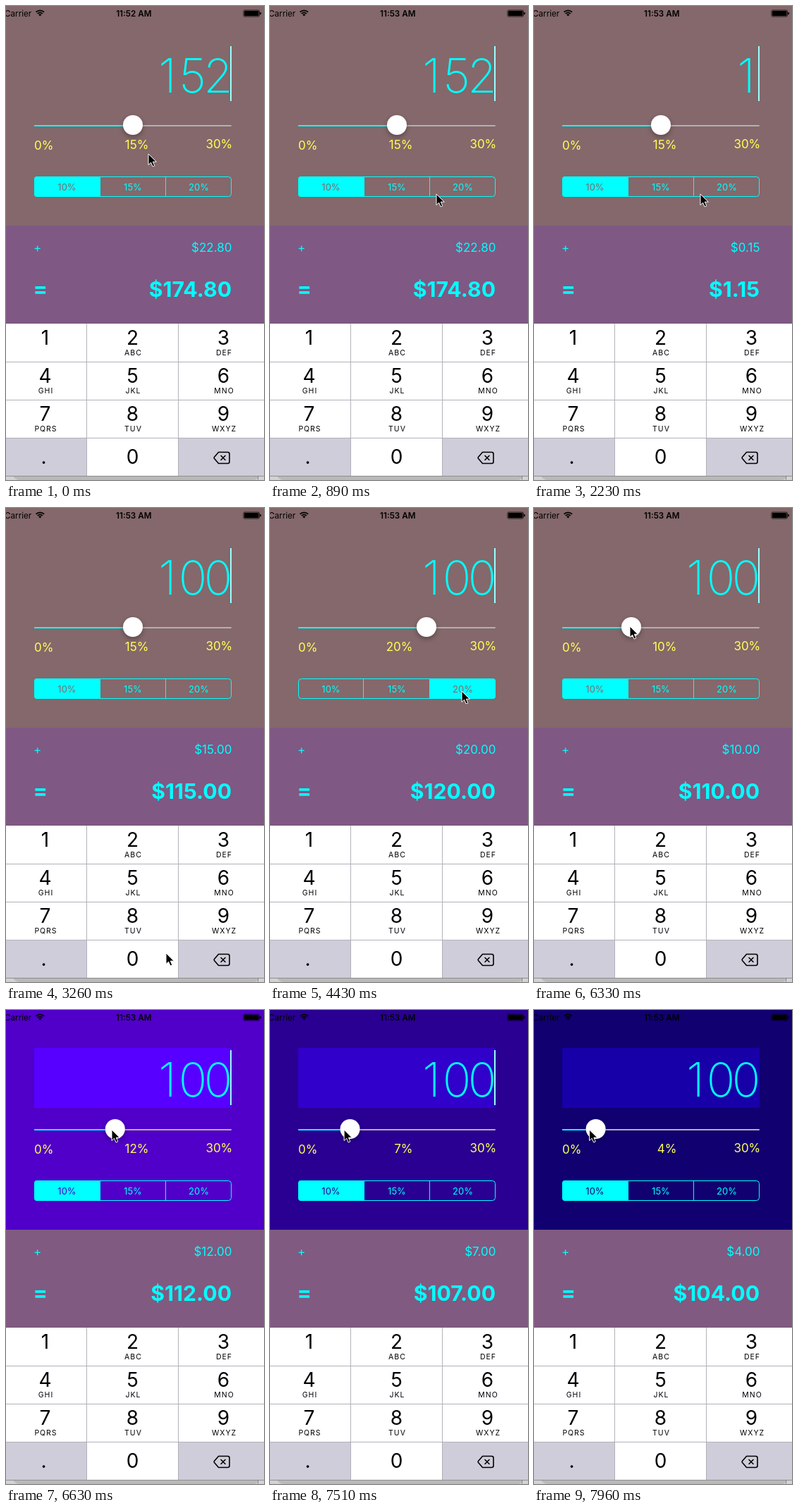
Write an HTML page that moves like this. It is 366 by 673 pixels and loops after 8 s.

```html
<!DOCTYPE html>
<html lang="en">
<head>
<meta charset="utf-8">
<title>Tip calculator</title>
<style>
html, body { margin: 0; width: 100%; height: 100%; overflow: hidden; }
svg { display: block; width: 366px; height: 673px; font-family: Inter, Roboto, sans-serif; }
.mid { text-anchor: middle; }
.end { text-anchor: end; }
.cyan { fill: #0ff; }
.yellow { fill: #ffff55; font-size: 17px; }
.small { font-size: 17px; }
.bold { font-size: 30.2px; font-weight: 700; }
.big { font-size: 67px; font-weight: 200; }
.key { font-size: 28px; }
.sub { font-size: 10.5px; letter-spacing: 1px; }
.seg { font-size: 13px; }
</style>
</head>
<body>
<svg viewBox="0 0 366 673">
  <clipPath id="round"><rect x="40" y="242" width="280" height="29" rx="4"/></clipPath>
  <rect id="top" width="366" height="312"/>
  <rect id="panel" y="312" width="366" height="139"/>
  <rect id="field" x="40" y="54" width="280" height="85"/>

  <g font-size="11.7">
    <text x="-2" y="14.5">Carrier</text>
    <path d="M42.5 8.7a8.2 8.2 0 0 1 11.6 0M44.7 11a5 5 0 0 1 7.2 0" fill="none" stroke="#000" stroke-width="1.7"/>
    <path d="M46.2 12.3a3 3 0 0 1 4.2 0l-2.1 2.2z"/>
    <text id="clock" class="mid" x="181.3" y="14.5" font-weight="600"></text>
    <rect x="337" y="6" width="22.500" height="9" rx="1.800" fill="none" stroke="#000" stroke-width=".8"/>
    <rect x="338" y="7" width="20.500" height="7" rx="1"/>
    <rect x="360.3" y="8.7" width="1.6" height="3.6" rx=".8"/>
  </g>

  <text id="bill" class="big mid cyan" y="123"></text>
  <rect id="caret" x="318" y="57" width="2" height="78" fill="#9ff"/>

  <rect x="40" y="169" width="280" height="2" rx="1" fill="#b3b0b3"/>
  <rect id="track" class="cyan" x="40" y="169" height="2" rx="1"/>
  <circle id="knob" cy="169" r="14" fill="#fff" style="filter:drop-shadow(0 3px 3px rgba(0,0,0,.3))"/>
  <text class="yellow" x="40" y="204">0%</text>
  <text id="rate" class="yellow end" x="202.5" y="203"></text>
  <text class="yellow end" x="321.3" y="202">30%</text>

  <g id="segs" clip-path="url(#round)"></g>
  <rect x="40.5" y="242.5" width="279" height="28" rx="4" fill="none" stroke="#0ff"/>
  <path d="M132.5 242v29M226.5 242v29" stroke="#0ff"/>

  <text class="small cyan" x="39" y="349">+</text>
  <text id="tip" class="small end cyan" x="320.500" y="349"></text>
  <text class="bold cyan" x="38.5" y="411.500">=</text>
  <text id="total" class="bold end cyan" x="320" y="413"></text>

  <g id="keys"></g>
  <path d="M0 505.5h366m-366 54h366m-366 54h366M114.5 451v216m130 0v-216" fill="none" stroke="#b2b1b8"/>
  <g fill="none" stroke="#000" stroke-width="1.6" stroke-linejoin="round" stroke-linecap="round">
    <path d="M301.5 633.5h13q2.5 0 2.5 2.5v11q0 2.5-2.5 2.5h-13l-6-7q-.8-1 0-2z"/>
    <path d="M305 638.5l6 6m0-6l-6 6"/>
  </g>
  <rect y="667" width="366" height="6" fill="#d2d2d2"/>
  <path d="M10 667h350q-3 6-10 6h-330q-7 0-10-6z" fill="#b9b9b9"/>
  <path d="M0 667.5h366M357.5 668v5" stroke="#8e8e8e"/>

  <path id="mouse" d="M0 0v15.5l3.6-3.3 2.5 5.8 2.7-1.2-2.5-5.6h5z" stroke="#fff" stroke-linejoin="round"/>
</svg>
<script>
const LOOP = 8000, STEP = 147.2, DRAG = 44;
const $ = id => document.getElementById(id);
const set = (id, attrs) => { for (const k in attrs) $(id).setAttribute(k, attrs[k]); };
const clamp = v => Math.max(0, Math.min(1, v));
const money = v => '$' + v.toFixed(2);

// Where the mouse rests: arrival step, leaving step, x, y
const rests = [
  [0, 1, 202, 210], [4, 4, 186, 384], [6, 15, 236, 267], [19, 23, 227, 632],
  [27, 30, 272, 260], [35, 35, 167, 256], [38, 39, 90, 257], [43, 43, 136, 168]
];
// Hard changes: step and new value
const bills = [[0, '152'], [12, '15'], [15, '1'], [19, '10'], [21, '100']];
const picks = [[0, 0], [29, 2], [36, 1], [39, 0]];
const latest = (list, n) => list.findLast(e => e[0] <= n)[1];

const percents = [10, 15, 20];
const segX = i => Math.round(40 + i * 280 / 3);
$('segs').innerHTML = percents.map((p, i) =>
  `<rect id="seg${i}" x="${segX(i)}" y="242" width="94" height="29"/>
   <text id="lab${i}" class="seg mid" x="${86.5 + 93.5 * i}" y="261.5">${p}%</text>`).join('');

const labels = ['1', '2 ABC', '3 DEF', '4 GHI', '5 JKL', '6 MNO', '7 PQRS', '8 TUV', '9 WXYZ', '.', '0', ''];
const midX = [55.5, 179.5, 308.5];
$('keys').innerHTML = labels.map((label, i) => {
  const [digit, sub = ''] = label.split(' ');
  const col = i % 3, row = Math.floor(i / 3), y = 451 + 54 * row;
  const fill = /\d/.test(digit) ? '#fff' : '#cfcdd9';
  return `<rect id="key${i}" x="${[0, 114, 244][col]}" y="${y}" width="131" height="54" fill="${fill}"/>
    <text class="key mid" x="${midX[col] - (digit === '.' ? 2 : 0)}" y="${y + (row < 3 ? 30 : 37)}">${digit}</text>
    <text class="sub mid" x="${midX[col] + 1}" y="${y + 45}">${sub}</text>`;
}).join('');

function rateAt(n) {
  if (n < 29) return 15;
  if (n < DRAG) return percents[latest(picks, n)];
  return n <= 45 ? n - 33 : 12 - 8 * ((n - 45) / 9) ** 1.2;
}
const knobX = rate => 54 + rate * 8.4;

function mouseAt(n) {
  // While dragging, the knob trails the mouse by one step
  if (n >= DRAG) return [knobX(rateAt(n + 1)), 170];
  const i = rests.findLastIndex(r => r[0] <= n);
  const [, leave, x, y] = rests[i], [arrive, , x2, y2] = rests[i + 1] || [n + 1, 0, x, y];
  const k = clamp((n - leave) / (arrive - leave)), ease = k * k * (3 - 2 * k);
  return [x + (x2 - x) * ease, y + (y2 - y) * ease];
}

// The caret stays lit while typing, then blinks once a second
function caretAt(t) {
  if (t > 1760 && t < 3500) return 1;
  const p = (t + (t < 1760 ? 400 : 0)) % 1000;
  return clamp(Math.min((p - 100) / 150, (800 - p) / 150));
}

function draw(t) {
  const n = Math.floor((t + 1) / STEP);
  const bill = latest(bills, n), pick = latest(picks, n), tap = latest(picks, n + 1);
  const rate = rateAt(n), whole = Math.round(rate), tip = bill * whole / 100;
  const dragged = n >= DRAG, red = 8 * rate - 16, blue = 68 + 11 * rate;
  const back = dragged ? `rgb(${red},0,${blue})` : '#84686b';

  set('top', { fill: back });
  set('panel', { fill: dragged ? '#805a81' : '#7f5883' });
  set('field', { fill: dragged ? `rgb(${red + 8},0,${blue + 56})` : 'none' });
  set('caret', { opacity: caretAt(n * STEP) });

  const x = knobX(rate);
  set('knob', { cx: x });
  set('track', { width: x - 40 });
  percents.forEach((_, i) => {
    set('seg' + i, { fill: i === pick || i === tap ? '#0ff' : 'none', 'fill-opacity': i === pick ? 1 : .17 });
    set('lab' + i, { fill: i === pick ? back : '#0ff' });
  });
  const zeroTyped = bill.endsWith('0') && bill !== latest(bills, Math.max(0, n - 1));
  set('key10', { fill: zeroTyped ? '#cfcdd9' : '#fff' });

  // Digits sit in equal cells, flush right
  set('bill', { x: [...bill].map((_, i) => 301 - 36 * (bill.length - 1 - i)).join(' ') });
  $('bill').textContent = bill;
  $('clock').textContent = n < 2 ? '11:52 AM' : '11:53 AM';
  $('rate').textContent = whole + '%';
  $('tip').textContent = money(tip);
  $('total').textContent = money(+bill + tip);

  set('mouse', { transform: `translate(${mouseAt(n)})` });
}

const start = performance.now();
function tick() {
  draw((performance.now() - start) % LOOP);
  requestAnimationFrame(tick);
}
tick();
</script>
</body>
</html>
```
